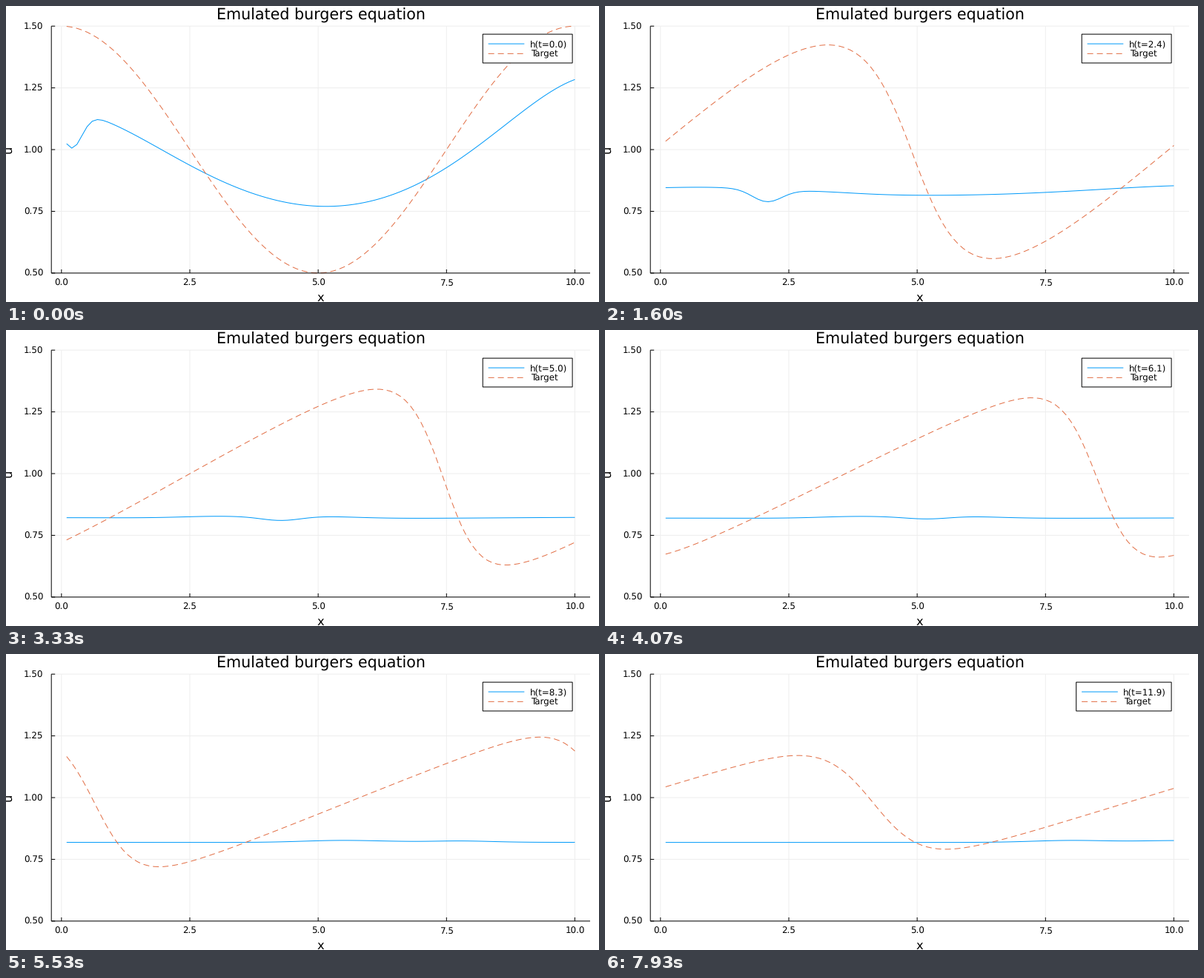
Write a matplotlib script that moves like this. It is 800x400 px and loops after 8 s.

```python
import numpy as np
import matplotlib.pyplot as plt
from matplotlib.animation import FuncAnimation
from matplotlib.patches import Rectangle

plt.rcParams["font.family"] = "DejaVu Sans"
plt.rcParams["text.hinting"] = "none"

W, H, DPI = 800, 400, 100
PX = 72 / DPI                      # points per pixel
LOOP, TICK_MS, STEPS = 8000, 20, 120
BLUE, ORANGE = "#009afa", "#e26f46"
LEFT, RIGHT, TOP, BOTTOM = 61.2, 788, 27.2, 360.9

DX = 0.1
X = np.arange(1, 101) * DX


def px(x):
    return LEFT + (x + 0.197) / 10.494 * (RIGHT - LEFT)


def py(u):
    return BOTTOM - (u - 0.5) * (BOTTOM - TOP)


def burgers(nu=0.1, dt=0.001, substeps=100):
    """Periodic viscous Burgers flow, upwind in space, one row per step."""
    u = 1 + 0.5 * np.cos(2 * np.pi * X / 10)
    rows = [u]
    for _ in range(STEPS - 1):
        for _ in range(substeps):
            back, ahead = np.roll(u, 1), np.roll(u, -1)
            u = u + dt * (nu * (ahead - 2 * u + back) / DX**2
                          - u * (u - back) / DX)
        rows.append(u)
    return rows


# Smooth curve through a few points of the opening wave
OPENING = np.polyval(np.polyfit(
    [0.1, 1, 2, 3.2, 5.1, 7, 8, 9, 10],
    [1.152, 1.102, 0.996, 0.863, 0.772, 0.865, 1.0, 1.156, 1.284], 6), X)
REST = 0.8185


def bump(centre, width):
    return np.exp(-((X - centre) / width) ** 2 / 2)


def emulated(t):
    """The opening wave decays to rest; a dip and two ripples drift right."""
    keep = np.exp(-1.25 * t**0.83)
    ripples = bump(-0.45 + 0.71 * t, 0.75) + bump(1.3 + 0.74 * t, 0.75)
    dip = 0.145 * np.exp(-0.45 * t) * bump(
        0.2 * np.exp(-t) + 0.857 * t, 0.2 + 0.036 * t)
    return keep * OPENING + (1 - keep) * (REST + 0.008 * ripples) - dip


fig = plt.figure(figsize=(W / DPI, H / DPI), dpi=DPI, facecolor="white")
ax = fig.add_axes([0, 0, 1, 1])
ax.set_xlim(0, W)
ax.set_ylim(H, 0)
ax.axis("off")


def line(xs, ys, color, z, dashed=False):
    ln, = ax.plot(xs, ys, color=color, lw=PX, zorder=z, snap=False,
                  solid_capstyle="butt", dash_capstyle="butt")
    if dashed:
        ln.set_dashes((8, 5))
    return ln


def label(x, y, s, size, ha="center", z=5, **kw):
    return ax.text(x, y, s, fontsize=size * PX, ha=ha, va="baseline",
                   color="black", zorder=z, **kw)


SMALL, GUIDE, TITLE = 11.83, 16.27, 20.7
for v in (0, 2.5, 5, 7.5, 10):
    x = px(v)
    line([x, x], [TOP, BOTTOM], "#eeeeee", 1)
    line([x, x], [BOTTOM, BOTTOM - 5], "black", 4)
    label(x, 378.3, f"{v:.1f}", SMALL)
for v in (0.5, 0.75, 1, 1.25, 1.5):
    y = py(v)
    line([LEFT, RIGHT], [y, y], "#eeeeee", 1)
    line([LEFT, LEFT + 5], [y, y], "black", 4)
    label(50.5, y + 4.3, f"{v:.2f}", SMALL, ha="right")
line([LEFT, RIGHT], [BOTTOM, BOTTOM], "black", 4)
line([LEFT, LEFT], [TOP, BOTTOM], "black", 4)
label(424.6, 18.5, "Emulated burgers equation", TITLE)
label(424.6, 399.4, "x", GUIDE)
label(8.4, 194, "u", GUIDE, rotation=90, rotation_mode="anchor")

wave = line(px(X), px(X), BLUE, 2)
goal = line(px(X), px(X), ORANGE, 3, dashed=True)

BOX_X, BOX_W = 643.2, 120.9
box = Rectangle((BOX_X, 38.1), BOX_W, 38.9, facecolor="white",
                edgecolor="black", lw=PX, zorder=6, snap=False)
ax.add_patch(box)
key_wave = line([0, 1], [51.1, 51.1], BLUE, 7)
key_goal = line([0, 1], [64.4, 64.4], ORANGE, 7, dashed=True)
txt_wave = label(0, 55.4, "", SMALL, ha="left", z=7)
txt_goal = label(0, 68.8, "Target", SMALL, ha="left", z=7)

flow = burgers()


def draw(tick):
    # each step starts on the tick nearest to its time
    step = int((tick * TICK_MS + 14) * STEPS / LOOP) % STEPS
    t = step / 10
    wave.set_ydata(py(emulated(t)))
    goal.set_ydata(py(flow[step]))
    shift = 7.5 if t >= 10 else 0      # legend grows by one digit
    box.set_x(BOX_X - shift)
    box.set_width(BOX_W + shift)
    for key in (key_wave, key_goal):
        key.set_xdata([650.6 - shift, 699.3 - shift])
    txt_wave.set_x(706.9 - shift)
    txt_goal.set_x(707.9 - shift)
    txt_wave.set_text(f"h(t={t:.1f})")
    return wave, goal, box, key_wave, key_goal, txt_wave, txt_goal


anim = FuncAnimation(fig, draw, frames=LOOP // TICK_MS, interval=TICK_MS,
                     repeat=True, repeat_delay=0, blit=False)
plt.show()
```
